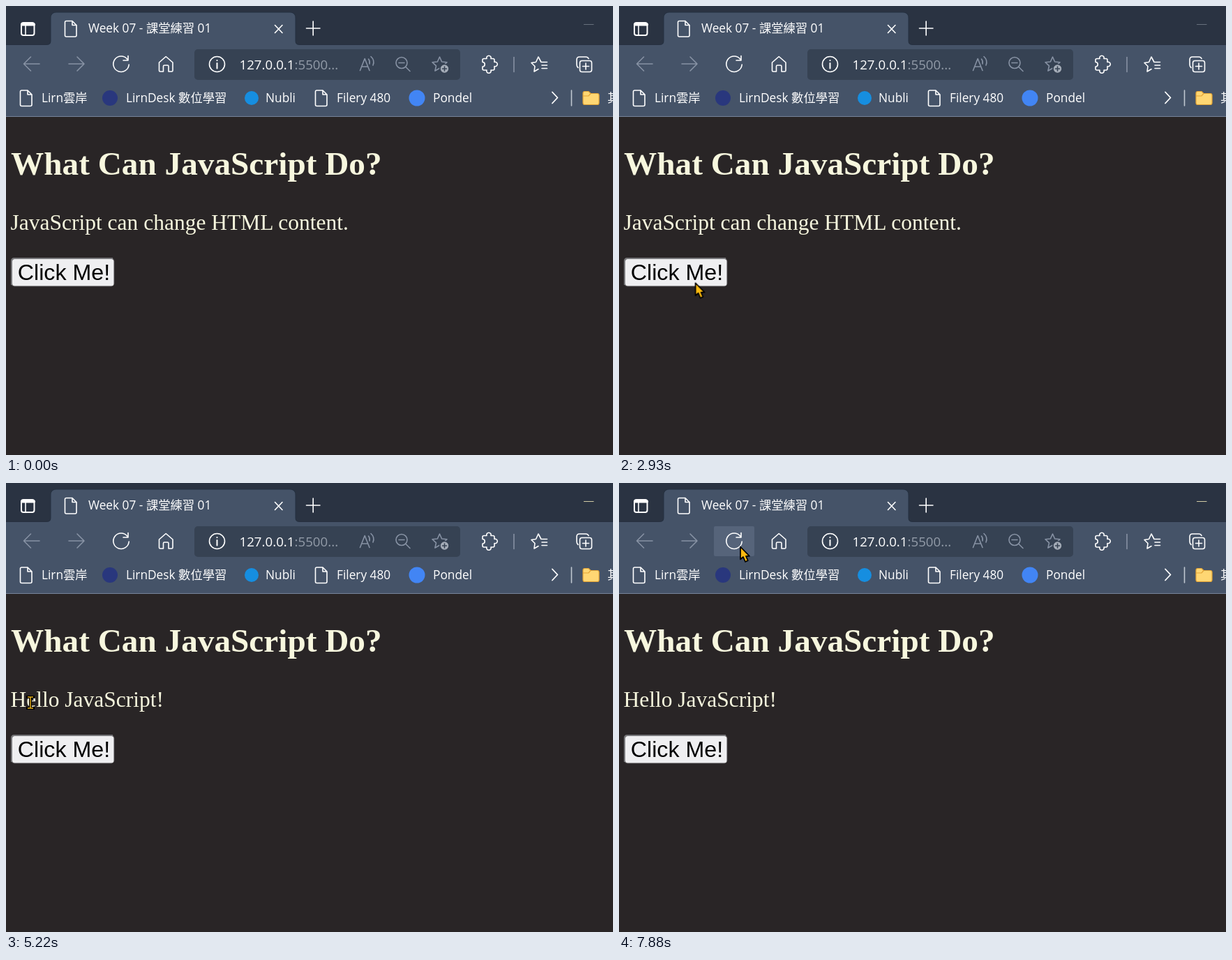
Animation of 870 by 644 pixels, one loop 8000 ms. Source, as an HTML page:

```html
<!DOCTYPE html>
<html lang="zh-Hant">
<head>
<meta charset="utf-8">
<title>Week 07</title>
<style>
html, body { margin: 0; width: 100%; height: 100%; overflow: hidden; background: #292526; }
svg { display: block; width: 870px; height: 644px; }
.ui { font: 17.3px "Open Sans", "Noto Sans CJK TC", "Noto Sans CJK", "Noto Sans CJK JP", sans-serif; fill: #fff; }
.url { font-size: 18.7px; }
.host { font-weight: 500; }
.page { font-family: "Liberation Serif", "Times New Roman", serif; font-size: 31.5px; fill: #f7f7de; }
.page .title { font-size: 47.25px; font-weight: bold; }
.button { font: 32.2px "Liberation Sans", Arial, sans-serif; fill: #000; }
.line { fill: none; stroke: #fff; stroke-width: 1.6; stroke-linecap: round; stroke-linejoin: round; }
.dim { stroke: #8792a4; }

/* every part holds its state unless a keyframe asks for steps */
.before, .after, .hover, .minimize, .cursor, .arrow, .beam { animation: 8s step-end infinite; }
.before { animation-name: before; }
.after { animation-name: after; }
.hover { animation-name: hover; }
.minimize { animation-name: minimize; }
.cursor { animation-name: move; }
.arrow { animation-name: arrow; }
.beam { animation-name: beam; }

@keyframes before { 0% { opacity: 1; } 40.75%, 100% { opacity: 0; } }
@keyframes after { 0% { opacity: 0; } 40.75%, 100% { opacity: 1; } }
@keyframes hover { 0% { opacity: 0; } 94.25%, 100% { opacity: 1; } }
@keyframes minimize { 0% { stroke: #68717d; } 40.75%, 100% { stroke: #d3cda6; } }
@keyframes arrow {
  0% { opacity: 0; }
  5.5% { opacity: 1; }
  52.2% { opacity: 0; }
  85.7% { opacity: 1; }
  88.1% { opacity: 0; }
  89.8%, 100% { opacity: 1; }
}
@keyframes beam {
  0% { opacity: 0; }
  52.2% { opacity: 1; }
  85.7% { opacity: 0; }
  88.1% { opacity: 1; }
  89.8%, 100% { opacity: 0; }
}
@keyframes move {
  0% { transform: translate(360px, 558px); }
  5.5% { transform: translate(360px, 558px); animation-timing-function: steps(2); }
  7.25% { transform: translate(233px, 496px); }
  11.5% { transform: translate(233px, 495px); }
  14.875% { transform: translate(233px, 495px); animation-timing-function: steps(5); }
  19.25% { transform: translate(180px, 487px); animation-timing-function: steps(3); }
  22% { transform: translate(142px, 468px); animation-timing-function: steps(4); }
  24.875% { transform: translate(120px, 442px); }
  29.875% { transform: translate(120px, 442px); animation-timing-function: steps(6); }
  35% { transform: translate(110px, 402px); animation-timing-function: steps(5); }
  40.75% { transform: translate(103px, 371px); animation-timing-function: steps(4); }
  44.25% { transform: translate(103px, 385px); }
  46.625% { transform: translate(103px, 385px); animation-timing-function: steps(6); }
  52.25% { transform: translate(21px, 328px); animation-timing-function: steps(3); }
  54.875% { transform: translate(222px, 325px); }
  55.75% { transform: translate(200px, 327px); animation-timing-function: steps(2); }
  57.5% { transform: translate(176px, 325px); animation-timing-function: steps(7); }
  63.5% { transform: translate(23px, 319px); animation-timing-function: steps(2); }
  65.25% { transform: translate(35px, 315px); animation-timing-function: steps(3); }
  67.875% { transform: translate(174px, 313px); animation-timing-function: steps(3); }
  70.5% { transform: translate(255px, 328px); animation-timing-function: steps(2); }
  72.25% { transform: translate(271px, 323px); }
  73.125% { transform: translate(271px, 323px); animation-timing-function: steps(5); }
  77.25% { transform: translate(170px, 307px); animation-timing-function: steps(4); }
  80.625% { transform: translate(89px, 314px); }
  81.5% { transform: translate(87px, 314px); animation-timing-function: steps(3); }
  84% { transform: translate(146px, 306px); }
  84.875% { transform: translate(146px, 306px); animation-timing-function: steps(4); }
  88.125% { transform: translate(297px, 250px); animation-timing-function: steps(3); }
  90.75% { transform: translate(205px, 165px); animation-timing-function: steps(2); }
  92.5% { transform: translate(142px, 122px); animation-timing-function: steps(2); }
  94.25% { transform: translate(165px, 74px); }
  95.125% { transform: translate(174px, 91px); animation-timing-function: steps(4); }
  98.5%, 100% { transform: translate(173px, 90px); }
}
</style>
</head>
<body>
<svg viewBox="0 0 870 644">
  <defs>
    <path id="doc" d="M2.5 0H11L17 6V20.5Q17 22.5 15 22.5H2.5Q.5 22.5 .5 20.5V2Q.5 0 2.5 0ZM11 0V6H17"/>
    <path id="star" d="M0-11L3.1-4 10.5-3.3 5 1.8 6.6 9 0 5.3-6.6 9-5 1.8-10.5-3.3-3.1-4Z"/>
    <path id="ibeam" d="M-4-8H4M0-8V8M-4 8H4"/>
    <path id="tab" d="M58 56Q64.5 56 64.500 50V17Q64.500 9.500 72 9.500H407Q414.500 9.500 414.500 17V50Q414.500 56 421 56"/>
  </defs>

  <rect width="870" height="56" fill="#2a3342"/>
  <path d="M0 55.500H870" stroke="#273040"/>
  <use href="#tab" fill="none" stroke="#253040" stroke-width="2"/>
  <rect y="56" width="870" height="102" fill="#455368"/>
  <use href="#tab" fill="#455368"/>
  <rect y="158" width="870" height="1" fill="#77859a"/>
  <rect x="270" y="62" width="381" height="44" rx="5" fill="#364253"/>
  <rect class="hover" x="136" y="62" width="58" height="43" rx="2" fill="#56647a"/>

  <!-- tab strip -->
  <g class="line">
    <rect x="22" y="24" width="18.5" height="18" rx="3" stroke-width="2"/>
    <path d="M23 26.5H40" stroke-width="4"/>
    <path d="M28 28V41"/>
    <use href="#doc" x="84" y="21.5"/>
    <path d="M385.5 27.5L396 38.5M396 27.5L385.5 38.5M430.5 32H450M440.2 22V42"/>
    <path class="minimize" d="M828.5 26.5H842" stroke-width="1.2"/>
  </g>

  <!-- toolbar -->
  <g class="line">
    <path class="dim" d="M48 83H25.5M35.5 73L25.5 83 35.5 93M90 83H112M102 73L112 83 102 93"/>
    <path d="M174 76.5A11.2 11.2 0 1 0 176.2 84M175 71.5V78H168"/>
    <path d="M219.5 81L229.2 72.5 239 81V92.5Q239 94 237.5 94H233V86.5Q233 85 231.5 85H227Q225.5 85 225.5 86.5V94H221Q219.5 94 219.5 92.5Z"/>
    <circle cx="302.5" cy="83.5" r="11"/>
    <path d="M302.5 82V89.5M302.5 78V78.2" stroke-width="2"/>
    <g class="dim">
      <path d="M507.5 92.5L514.2 75.5 521 92.5M510 87H518.5"/>
      <path d="M519.5 76Q522 79 521 83M523 72.5Q529 78 526 85"/>
      <circle cx="567" cy="81.5" r="8"/>
      <path d="M573 87.5L579 93.5M563 81.5H571"/>
      <use href="#star" x="621.5" y="84"/>
      <circle cx="628.5" cy="90" r="6.5" fill="#a5adb8" stroke="#364253"/>
    </g>
    <path d="M625.5 90H631.5M628.5 87V93" stroke="#364253"/>
    <path d="M685 75.5H689A3.2 3.2 0 1 1 695 75.5H698Q700 75.5 700 77.5V80.5A3.2 3.2 0 1 1 700 86.5V90Q700 92 698 92H695A3.2 3.2 0 1 1 689 92H685Q683 92 683 90V87A3.2 3.2 0 0 0 683 80.5V77.5Q683 75.5 685 75.5Z"/>
    <path class="dim" d="M728 73.5V94.5"/>
    <path d="M767 80.5L763 73 759.5 80.5 753 81.5 758 86.5 757 94 763 90.5M768 80.5H775.5M768 85H775.5M768 89.5H775.5"/>
    <rect x="822.5" y="78.5" width="17" height="16" rx="3"/>
    <path d="M831 82V91M826.5 86.5H835.5M820 88.5Q818 87 818 84V77Q818 73 822 73H831Q834 73 835 75.5"/>
  </g>

  <!-- bookmark bar -->
  <g class="line">
    <use href="#doc" x="20" y="121"/>
    <use href="#doc" x="443" y="121"/>
    <path d="M783 123.5L790.5 131.5 783 139.5" stroke-width="1.8"/>
    <path d="M810.5 121V143" stroke="#c0c7d1"/>
  </g>
  <circle cx="149" cy="132" r="11" fill="#29377d"/>
  <circle cx="352" cy="132" r="10" fill="#168ee0"/>
  <circle cx="589" cy="132" r="11.5" fill="#4285f4"/>
  <g stroke="#e3a436" stroke-width="1.2">
    <path d="M827 125Q827 122.5 829.5 122.5H835L838 125.5H847.5Q850 125.5 850 128V139Q850 141.5 847.5 141.5H829.5Q827 141.5 827 139Z" fill="#ffd773"/>
    <path d="M827 129H835L838 125.5" fill="none"/>
  </g>

  <g class="ui">
    <text x="118" y="38">Week 07 - 課堂練習 01</text>
    <text class="url" x="334.5" y="90.5"><tspan class="host">127.0.0.1</tspan><tspan fill="#929ba8">:5500...</tspan></text>
    <text x="51" y="137.5">Lirn雲岸</text>
    <text x="172" y="137.5">LirnDesk 數位學習</text>
    <text x="372" y="137.5">Nubli</text>
    <text x="474" y="137.5">Filery 480</text>
    <text x="612" y="137.5">Pondel</text>
    <text x="862" y="137.5">其</text>
  </g>

  <!-- web page -->
  <g class="page">
    <text class="title" x="7" y="241.6">What Can JavaScript Do?</text>
    <text class="before" x="6.5" y="321">JavaScript can change HTML content.</text>
    <text class="after" x="6.5" y="321">Hello JavaScript!</text>
  </g>
  <rect x="7" y="361" width="148.5" height="41.5" rx="5" fill="#4d4b4c"/>
  <path d="M8 400V366Q8 362 12 362H153" fill="none" stroke="#77777a" stroke-width="2"/>
  <rect x="9" y="363" width="145.5" height="38.5" rx="3.5" fill="#efeff1"/>
  <text class="button" x="16.8" y="392.5">Click Me!</text>

  <g class="cursor">
    <path class="arrow" d="M1 1.5V19.5L5 16 8 23 11.8 21.3 9 14.8H14Z" fill="#fab90f" stroke="#000" stroke-width="1.7" stroke-linejoin="round"/>
    <g class="beam" fill="none">
      <use href="#ibeam" stroke="#000" stroke-width="4" stroke-linecap="square"/>
      <use href="#ibeam" stroke="#e5ae1b" stroke-width="1.5"/>
    </g>
  </g>
</svg>
</body>
</html>
```
